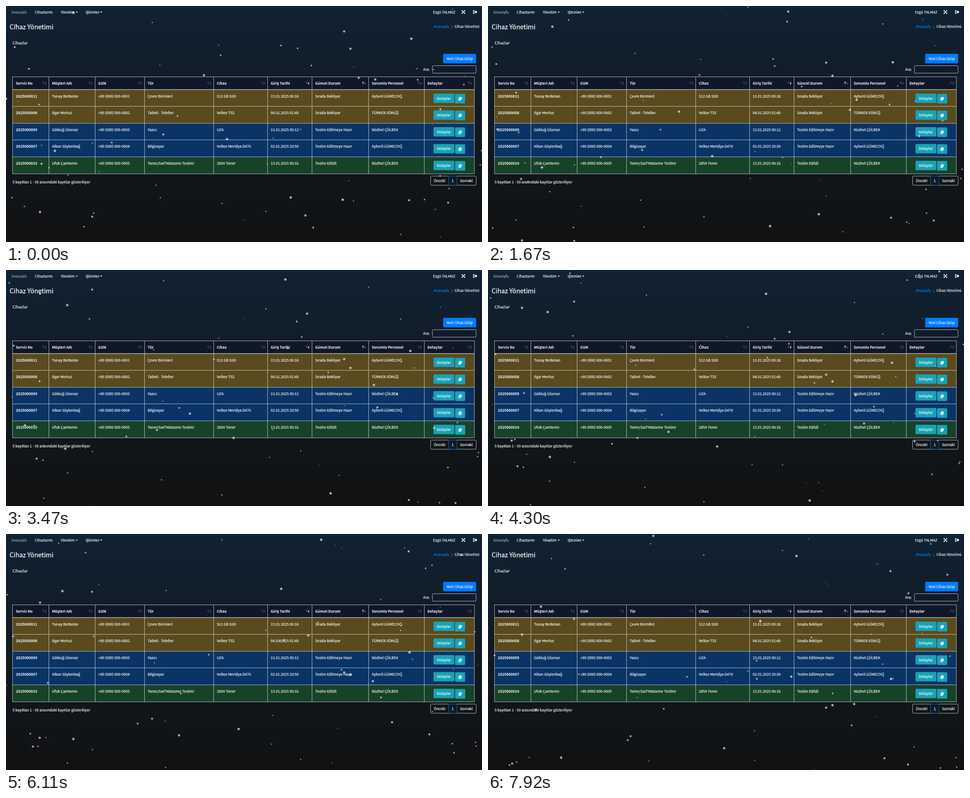
These frames come from a looping animation (1060 px wide and 528 px high, 7990 ms). An HTML page:

```html
<!DOCTYPE html>
<html lang="tr">
<head>
<meta charset="utf-8">
<title>Cihaz Yönetimi</title>
<style>
  html, body { margin: 0; width: 100%; height: 100%; overflow: hidden; background: #111; }
  svg { display: block; width: 1060px; height: 528px; }
  text {
    font: 8.05px "Noto Sans CJK JP", "Noto Sans CJK SC", "Noto Sans CJK", "Noto Sans", sans-serif;
    color: #fff; fill: currentColor; stroke: currentColor; stroke-width: .18px;
  }
  .bold { font-weight: 700; stroke: none; }
  .mid { text-anchor: middle; }
  .line { fill: none; stroke: #dee2e6; stroke-opacity: .78; }
  .arrow { fill: none; stroke: #fff; opacity: .3; }
  .arrow.on { opacity: 1; }
</style>
</head>
<body>
<svg viewBox="0 0 1060 528">
  <defs>
    <linearGradient id="night" x2="0" y2="1">
      <stop stop-color="#112233"/><stop offset="1" stop-color="#111111"/>
    </linearGradient>
    <path id="flake" d="M-1 0H1M-.5-.87L.5 .87M.5-.87L-.5 .87M.6 0L.3 .52H-.3L-.6 0L-.3-.52H.3Z"
      fill="none" stroke="#fff" stroke-width=".26"/>
    <path id="copy" d="M-1.3-4H1.9L3.6-2.3V2H-1.3ZM-3.6-2.3H-1.9V2.6H1.7V4H-3.6Z" fill="#fff"/>
  </defs>
  <rect width="1060" height="528" fill="url(#night)"/>
  <g id="page"></g>
  <g id="snow" opacity=".8"></g>
</svg>
<script>
const WIDTH = 1060, HEIGHT = 528;
const page = document.getElementById('page');
const snow = document.getElementById('snow');

function add(parent, tag, attrs, content) {
  const el = document.createElementNS('http://www.w3.org/2000/svg', tag);
  for (const key in attrs) el.setAttribute(key, attrs[key]);
  if (content) el.textContent = content;
  parent.append(el);
  return el;
}
const text = (x, y, content, attrs) => add(page, 'text', { x, y, ...attrs }, content);
const path = (d, attrs) => add(page, 'path', { d, ...attrs });
const box = (x, y, width, height, attrs) => add(page, 'rect', { x, y, width, height, ...attrs });

function drawHeader() {
  text(12, 17, 'Anasayfa', { opacity: .6 });
  text(64, 17, 'Cihazlarım');
  text(122, 17, 'Yönetim');
  text(177.5, 17, 'İşlemler');
  for (const x of [155, 209.3]) path(`M${x} 12.7h5l-2.5 2.6z`, { fill: '#fff' });
  text(951, 17, 'Ezgü TALMAZ');

  path('M1015.5 10.5l6.2 6.2M1021.7 10.5l-6.2 6.2', { stroke: '#fff', 'stroke-width': 1.5 });
  path('M1014.6 9.6h3l-3 3zM1022.6 9.6v3l-3-3zM1014.6 17.6v-3l3 3zM1022.6 17.6h-3l3-3z', { fill: '#fff' });
  path('M1043.6 10.3h-2.6v6.4h2.6', { fill: 'none', stroke: '#fff', 'stroke-width': 1.4 });
  path('M1043 12.2h2.6v-2.5l4 3.8l-4 3.8v-2.5h-2.6z', { fill: '#fff' });

  text(8, 52.4, 'Cihaz Yönetimi', { style: 'font-size:14.2px;stroke-width:.25px' });
  text(952.7, 49, 'Anasayfa', { style: 'color:#007bff' });
  text(991.3, 49, '/', { style: 'color:#6c757d' });
  text(998.7, 49, 'Cihaz Yönetimi');
  text(14.7, 85.7, 'Cihazlar', { style: 'font-size:8.8px' });

  box(973.5, 107, 73.5, 21.3, { rx: 2, fill: '#007bff' });
  text(1010.3, 121, 'Yeni Cihaz Girişi', { class: 'mid' });
  text(929, 144.7, 'Ara:');
  box(949.5, 133.5, 97.5, 16.7, { rx: 2, class: 'line' });
}

const left = 15, right = 1043, top0 = 158.5, bodyTop = 187.3, rowHeight = 37.55;
const columns = [
  { title: 'Servis No', x: left }, { title: 'Müşteri Adı', x: 95.5 }, { title: 'GSM', x: 198.5 },
  { title: 'Tür', x: 308.5 }, { title: 'Cihaz', x: 462.5 },
  { title: 'Giriş Tarihi', x: 582.5, sort: 'down' }, { title: 'Güncel Durum', x: 681.5, sort: 'up' },
  { title: 'Sorumlu Personel', x: 807.5 }, { title: 'Detaylar', x: 931.5 }
];
const rowColors = {
  'Sırada Bekliyor': '#594b1d', 'Teslim Edilmeye Hazır': '#0a3466', 'Teslim Edildi': '#17422a'
};
const records = `
2025000011|Tunay Berkolan|Çevre Birimleri|512 GB SSD|13.01.2025 00:18|Sırada Bekliyor|Ayberil GÜMELTAŞ
2025000008|Ilgar Mertuz|Tablet - Telefon|Velkor T52|04.01.2025 01:40|Sırada Bekliyor|TÜRKER SÖNÜŞ
2025000009|Göktuğ Ülsenar|Yazıcı|UZA|13.01.2025 00:12|Teslim Edilmeye Hazır|Nüzhet ÇÖLBEK
2025000007|Alkan Söylenbağ|Bilgisayar|Velkor Meridya D470|02.01.2025 20:50|Teslim Edilmeye Hazır|Ayberil GÜMELTAŞ
2025000010|Ufuk Çamteren|Toner/Sarf Malzeme Teslimi|285A Toner|13.01.2025 00:16|Teslim Edildi|Nüzhet ÇÖLBEK
`.trim().split('\n').map(line => line.split('|'));

function drawRow(cells, r) {
  const y = bodyTop + r * rowHeight;
  cells.splice(2, 0, `+90 (000) 000-000${r + 1}`);
  box(left, y, right - left, rowHeight, { fill: rowColors[cells[6]] });
  cells.forEach((cell, i) => text(columns[i].x + 7, y + 17.4, cell, { class: i ? '' : 'bold' }));
  box(952, y + 8.7, 46.3, 21, { rx: 2, fill: '#17a2b8' });
  text(975, y + 22.4, 'Detaylar', { class: 'mid' });
  box(1000, y + 9.2, 22.5, 21.5, { rx: 2, fill: '#17a2b8' });
  add(page, 'use', { href: '#copy', transform: `translate(1011.2 ${y + 20.2})` });
  if (r) path(`M${left} ${Math.floor(y) + .5}H${right}`, { class: 'line' });
}

function drawTable() {
  box(left, top0, right - left, bodyTop - top0, { fill: '#101728' });
  columns.forEach(({ title, x, sort }, i) => {
    const end = columns[i + 1]?.x ?? right;
    text(x + 7, 176, title, { class: 'bold' });
    path(`M${end - 12.3} 175v-5.5m-2 2l2-2l2 2`, { class: sort === 'up' ? 'arrow on' : 'arrow' });
    path(`M${end - 7.6} 169.5v5.5m-2-2l2 2l2-2`, { class: sort === 'down' ? 'arrow on' : 'arrow' });
  });
  records.forEach(drawRow);
  box(left - .5, top0, right - left + .5, 217, { class: 'line' });
  path(`M${left} 187H${right}`, { class: 'line', 'stroke-width': 1.5 });
  columns.slice(1).forEach(({ x }) => path(`M${x} ${top0}v217`, { class: 'line' }));
}

function drawFooter() {
  text(14.7, 396.5, '5 kayıttan 1 - 50 arasındaki kayıtlar gösteriliyor');
  box(945.5, 380.5, 101.5, 20.5, { rx: 2, class: 'line' });
  box(985.5, 380.5, 18.5, 20.5, { fill: '#121a24', stroke: '#0062cc' });
  text(965.7, 394, 'Önceki', { class: 'mid' });
  text(994.8, 394, '1', { class: 'mid' });
  text(1025.4, 394, 'Sonraki', { class: 'mid' });
}

let seed = 41;
const random = () => (seed = seed * 16807 % 2147483647) / 2147483647;
const between = (low, high) => low + random() * (high - low);
const wrap = (value, size) => ((value + 5) % size + size) % size - 5;

// Each flake falls in a straight line; speeds lean towards the slow end.
const makeFlake = () => ({
  x: between(0, WIDTH), y: between(0, HEIGHT),
  drift: between(-1, 1) ** 3 * 14, fall: 18 + 32 * random() ** 1.5,
  size: between(.8, 3.3), angle: between(0, 60),
  el: add(snow, 'use', { href: '#flake' })
});
const flakes = Array.from({ length: 72 }, makeFlake);

const LOOP = 7990, LAST = 114, STEP = 7920 / LAST;

function update(ms) {
  const step = Math.min(LAST, Math.floor(ms % LOOP / STEP + .01));
  const t = step * STEP / 1000;
  for (const { el, x, y, drift, fall, size, angle } of flakes) {
    const cx = wrap(x + drift * t, WIDTH + 10).toFixed(2);
    const cy = wrap(y + fall * t, HEIGHT + 10).toFixed(2);
    el.setAttribute('transform', `translate(${cx} ${cy}) rotate(${angle}) scale(${size})`);
  }
}

drawHeader();
drawTable();
drawFooter();
const start = performance.now();
function tick() {
  update(performance.now() - start);
  requestAnimationFrame(tick);
}
tick();
</script>
</body>
</html>
```
